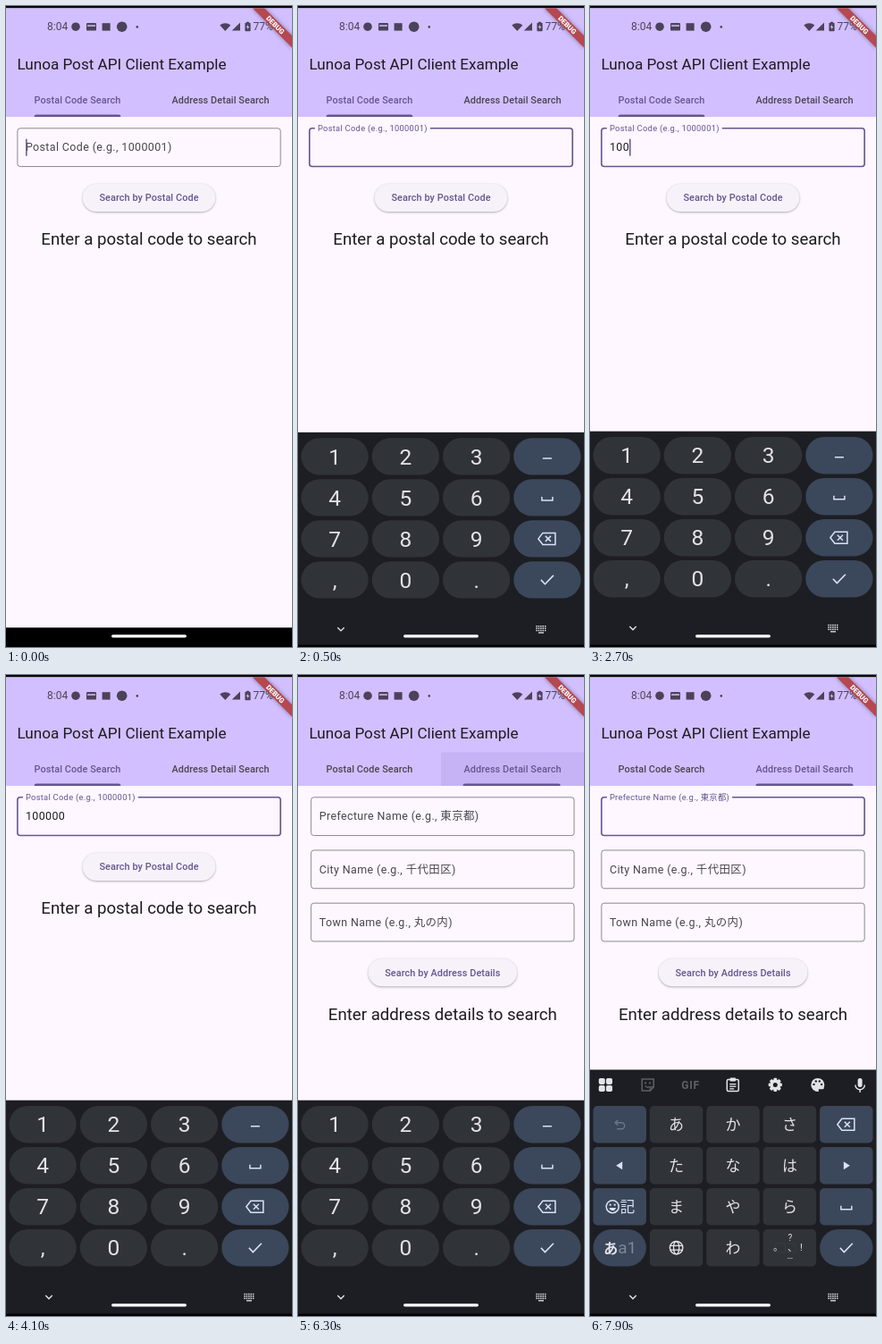
Animation of 320x717 px, one loop 8 s. Source, as an HTML page with a canvas:

```html
<!DOCTYPE html>
<html lang="en">
<head>
<meta charset="utf-8">
<title>Lunoa Post API Client Example</title>
<style>
html, body { margin: 0; width: 100%; height: 100%; overflow: hidden; background: #000; }
canvas { display: block; width: 320px; height: 717px; }
</style>
</head>
<body>
<canvas id="stage"></canvas>
<script>
const W = 320, H = 717, LOOP = 8000;
const DP = W / 411.43;
const canvas = document.getElementById('stage');
const ctx = canvas.getContext('2d');
const ratio = Math.max(1, window.devicePixelRatio || 1);
canvas.width = W * ratio;
canvas.height = H * ratio;

const BAR = '#d2bfff', PAGE = '#fef7ff', INK = '#1d1b20', SOFT = '#49454f';
const PRIMARY = '#65558f', OUTLINE = '#79747e', STATUS = '#4b4359';
const KB = '#1d1e23', KEY = '#303338', KEY_BLUE = '#3b475a';
const GLYPH = '#e3e3e8', GLYPH_BLUE = '#d8e3f8', DIM = '#5d6067';
const FONTS = 'Roboto, "Noto Sans CJK JP", sans-serif';

const FOCUS_1 = 40, KB_UP = 170, SEARCH = 4150, RESULTS = 4650;
const SWIPE = 6031, FOCUS_2 = 7200, KB_SWAP = 7400;
const TYPED = [[1150, '1'], [1450, '0'], [1700, '0'], [2950, '0'], [3200, '0'], [3500, '0']];
const TOWNS = ['', '大手町', '皇居外苑', '千代田', '一ツ橋', '丸の内', '有楽町'];

const clamp = v => Math.min(1, Math.max(0, v));
const span = (t, from, length) => clamp((t - from) / length);
const mix = (a, b, k) => a + (b - a) * k;
const easeOut = k => 1 - Math.pow(1 - k, 4);

// cubic-bezier(.25, .1, .25, 1)
function ease(x) {
  let lo = 0, hi = 1;
  for (let i = 0; i < 20; i++) {
    const s = (lo + hi) / 2;
    if (0.75 * s * (1 - s) + s * s * s < x) lo = s; else hi = s;
  }
  const s = lo, r = 1 - s;
  return 0.3 * s * r * r + 3 * s * s * r + s * s * s;
}

function mixColor(a, b, k) {
  const part = (c, i) => parseInt(c.slice(i, i + 2), 16);
  return 'rgb(' + [1, 3, 5].map(i => Math.round(mix(part(a, i), part(b, i), k))) + ')';
}

// y is the middle of the line box
function text(str, x, y, size, color, o = {}) {
  ctx.font = `${o.weight || 400} ${size}px ${FONTS}`;
  ctx.letterSpacing = (o.gap || 0) + 'px';
  ctx.textAlign = o.align || 'left';
  ctx.fillStyle = color;
  ctx.fillText(str, x, y + 0.342 * size);
  const width = ctx.measureText(str).width;
  ctx.letterSpacing = '0px';
  return width;
}

function rect(x, y, w, h, color) {
  ctx.fillStyle = color;
  ctx.fillRect(x, y, w, h);
}

function round(x, y, w, h, r, color) {
  ctx.beginPath();
  ctx.roundRect(x, y, w, h, r);
  ctx.fillStyle = color;
  ctx.fill();
}

function disc(x, y, r, color) {
  ctx.beginPath();
  ctx.arc(x, y, r, 0, 7);
  ctx.fillStyle = color;
  ctx.fill();
}

function ring(x, y, rx, color, width, ry = rx) {
  ctx.beginPath();
  ctx.ellipse(x, y, rx, ry, 0, 0, 7);
  ctx.strokeStyle = color;
  ctx.lineWidth = width;
  ctx.stroke();
}

function trace(points, dx, dy) {
  ctx.beginPath();
  for (let i = 0; i < points.length; i += 2) ctx.lineTo(dx + points[i], dy + points[i + 1]);
}

function line(points, dx, dy, color, width = 1.3, closed = false) {
  trace(points, dx, dy);
  if (closed) ctx.closePath();
  ctx.strokeStyle = color;
  ctx.lineWidth = width;
  ctx.stroke();
}

function poly(points, dx, dy, color) {
  trace(points, dx, dy);
  ctx.fillStyle = color;
  ctx.fill();
}

function box(x, y, w, h, r, color, width) {
  ctx.beginPath();
  ctx.roundRect(x, y, w, h, r);
  ctx.strokeStyle = color;
  ctx.lineWidth = width;
  ctx.stroke();
}

function statusBar() {
  text('8:04', 46, 23, 12, STATUS);
  disc(78, 23.2, 4.8, STATUS);
  round(90, 19, 11, 8.6, 1.2, STATUS);
  rect(91, 21.3, 9, 1.5, BAR);
  rect(107.6, 19.2, 9, 8.4, STATUS);
  disc(129.7, 23.2, 5.8, STATUS);
  disc(146.8, 23.4, 1.3, STATUS);
  ctx.beginPath();
  ctx.moveTo(245.3, 28);
  ctx.arc(245.3, 28, 8.8, -Math.PI * 0.74, -Math.PI * 0.26);
  ctx.fillStyle = STATUS;
  ctx.fill();
  poly([252.8, 27.6, 262, 27.6, 262, 18.4], 0, 0, STATUS);
  round(269, 17.8, 3, 2, 0.5, STATUS);
  round(267.4, 18.8, 6.2, 9.4, 1, STATUS);
  poly([0.5, -3, -1.8, 0.6, -0.2, 0.6, -0.5, 3, 1.8, -0.6, 0.2, -0.6], 270.5, 23.5, BAR);
  text('77%', 276.5, 23, 12, STATUS);
}

function ribbon() {
  ctx.save();
  ctx.beginPath();
  ctx.rect(0, 2.5, W, 80);
  ctx.clip();
  ctx.translate(W, 2.5);
  ctx.rotate(Math.PI / 4);
  ctx.shadowColor = 'rgba(0,0,0,.4)';
  ctx.shadowBlur = 5 * ratio;
  rect(-40 * DP, 28 * DP, 80 * DP, 12 * DP, '#b54850');
  ctx.shadowColor = 'transparent';
  text('DEBUG', 0, 34 * DP, 10.2 * DP, '#fff', { weight: 900, align: 'center' });
  ctx.restore();
}

function header(t, k) {
  rect(0, 2.5, W, 121.5, BAR);
  statusBar();
  text('Lunoa Post API Client Example', 12.4, 64.8, 22 * DP, INK);

  const glow = span(t, 5950, 60) * (1 - span(t, 6350, 300));
  if (glow > 0) {
    ctx.save();
    ctx.beginPath();
    ctx.rect(160, 86.6, 160, 37.4);
    ctx.clip();
    ctx.globalAlpha = glow * 0.09;
    disc(240, 105, mix(20, 110, span(t, 5950, 240)), '#4f378b');
    ctx.restore();
  }
  const label = { weight: 500, align: 'center', gap: 0.08 };
  const w1 = text('Postal Code Search', 80, 105.2, 14 * DP, mixColor(PRIMARY, SOFT, k), label);
  const w2 = text('Address Detail Search', 240, 105.2, 14 * DP, mixColor(SOFT, PRIMARY, k), label);
  const w = mix(w1, w2, k);
  round(mix(80, 240, k) - w / 2, 121.6, w, 2.4, [2.3, 2.3, 0, 0], PRIMARY);
}

function caret(x, y) {
  rect(x, y - 9.5, 1.5, 19, PRIMARY);
}

function field(y, label, focus, value, caretOn) {
  const x = 16 * DP, w = W - 2 * x, h = 56 * DP, size = 16 * DP;
  const k = ease(focus), mid = y + h / 2;
  box(x + 0.4, y + 0.4, w - 0.8, h - 0.8, 3, mixColor(OUTLINE, PRIMARY, k), mix(0.85, 1.6, k));
  const scale = mix(1, 0.75, k);
  ctx.font = `400 ${size * scale}px ${FONTS}`;
  ctx.letterSpacing = 0.39 * scale + 'px';
  const labelW = ctx.measureText(label).width;
  if (k > 0.02) rect(mix(21.9 + labelW / 2, 18.9, k), y - 1.5, (labelW + 6) * k, 4, PAGE);
  text(label, 21.9, mix(mid, y + 0.6, k), size * scale, mixColor(SOFT, PRIMARY, k), { gap: 0.39 * scale });
  const valueW = value ? text(value, 21.9, mid, size, INK, { gap: 0.39 }) : 0;
  if (caretOn) caret(value ? 21.9 + valueW : 22.1, mid);
}

function button(label, y, glow) {
  const size = 14 * DP;
  ctx.font = `500 ${size}px ${FONTS}`;
  const w = ctx.measureText(label).width + label.length * 0.08 + 48 * DP;
  ctx.save();
  ctx.shadowColor = 'rgba(0,0,0,.32)';
  ctx.shadowBlur = 2.4 * ratio;
  ctx.shadowOffsetY = 0.9 * ratio;
  round(160 - w / 2, y, w, 31.1, 15.55, '#f7f2fa');
  ctx.restore();
  if (glow > 0) round(160 - w / 2, y, w, 31.1, 15.55, `rgba(101,85,143,${0.14 * glow})`);
  text(label, 160, y + 15.7, size, PRIMARY, { weight: 500, align: 'center', gap: 0.08 });
}

function blink(t) {
  const resets = [0, ...TYPED.map(p => p[0])].filter(r => r <= t);
  let from = resets[resets.length - 1];
  if (from === 3500) from = 3550;
  return t < from || Math.floor((t - from) / 500) % 2 === 0;
}

function postalPage(t) {
  const value = TYPED.filter(p => p[0] <= t).map(p => p[1]).join('');
  field(136.4, 'Postal Code (e.g., 1000001)', span(t, FOCUS_1, 167), value, blink(t));
  button('Search by Postal Code', 198.9, span(t, SEARCH, 80) * (1 - span(t, SEARCH + 200, 250)));
  if (t < RESULTS) {
    text('Enter a postal code to search', 160, 260.8, 24 * DP, INK, { align: 'center' });
  } else {
    TOWNS.forEach((town, i) =>
      text('東京都 千代田区 ' + town, 52.8, 262.5 + i * 26.5, 24 * DP, INK));
  }
}

function addressPage(t) {
  const caretOn = t >= FOCUS_2 && t < FOCUS_2 + 500;
  field(136.4, 'Prefecture Name (e.g., 東京都)', span(t, FOCUS_2, 167), '', caretOn);
  field(195.6, 'City Name (e.g., 千代田区)', 0);
  field(254.8, 'Town Name (e.g., 丸の内)', 0);
  button('Search by Address Details', 317.2, 0);
  text('Enter address details to search', 160, 379.2, 24 * DP, INK, { align: 'center' });
}

const icons = {
  minus: (x, y) => line([-5, 2, 5, 2], x, y, GLYPH_BLUE, 1.5),
  space: (x, y) => line([-6, -1, -6, 3, 6, 3, 6, -1], x, y, GLYPH_BLUE, 1.5),
  back(x, y) {
    line([-10, 0, -5, -6.5, 9, -6.5, 9, 6.5, -5, 6.5], x, y, GLYPH_BLUE, 1.5, true);
    line([-2, -3, 4, 3], x, y, GLYPH_BLUE, 1.5);
    line([4, -3, -2, 3], x, y, GLYPH_BLUE, 1.5);
  },
  check: (x, y) => line([-7, 0, -2.5, 4.8, 7, -5], x, y, GLYPH_BLUE, 1.6),
  undo(x, y) {
    const c = '#69768a';
    line([-2, -5, -5, -2, -2, 1], x, y, c, 1.4);
    ctx.beginPath();
    ctx.moveTo(x - 5, y - 2);
    ctx.lineTo(x + 2, y - 2);
    ctx.arc(x + 2, y + 1.5, 3.5, -Math.PI / 2, Math.PI / 2);
    ctx.lineTo(x - 3, y + 5);
    ctx.stroke();
  },
  left: (x, y) => poly([-4, 0, 3, -4.5, 3, 4.5], x, y, GLYPH_BLUE),
  right: (x, y) => poly([4, 0, -3, -4.5, -3, 4.5], x, y, GLYPH_BLUE),
  emoji(x, y) {
    ring(x - 8, y, 7, GLYPH_BLUE, 1.5);
    disc(x - 10.5, y - 2, 1.1, GLYPH_BLUE);
    disc(x - 5.5, y - 2, 1.1, GLYPH_BLUE);
    ctx.beginPath();
    ctx.arc(x - 8, y + 0.5, 3.8, 0.2, Math.PI - 0.2);
    ctx.fill();
    text('記', x + 0.5, y + 0.4, 16.5, GLYPH_BLUE);
  },
  mode(x, y) {
    text('あ', x - 18, y + 0.5, 16, GLYPH, { weight: 700 });
    text('a1', x - 2, y - 0.5, 19, '#7c8798');
  },
  globe(x, y) {
    ring(x, y, 7.2, GLYPH, 1.4);
    ring(x, y, 3.1, GLYPH, 1.3, 7.2);
    line([-6.6, -2.4, 6.6, -2.4], x, y, GLYPH, 1.2);
    line([-6.6, 2.4, 6.6, 2.4], x, y, GLYPH, 1.2);
  },
  marks(x, y) {
    box(x - 16, y - 5, 11, 10, 1, '#3c3f45', 0.8);
    box(x - 5, y - 5, 11, 10, 1, '#3c3f45', 0.8);
    const o = { align: 'center' };
    text('。', x - 13, y, 11, GLYPH, o);
    text('、', x + 3, y, 11, GLYPH, o);
    text('?', x + 0.5, y - 11, 10, GLYPH, o);
    text('!', x + 13, y, 11, GLYPH, o);
    text('…', x + 0.5, y + 9, 10, GLYPH, o);
  }
};

const PAD = [['1', '2', '3', 'minus'], ['4', '5', '6', 'space'], ['7', '8', '9', 'back'], [',', '0', '.', 'check']];
const KANA = [['undo', 'あ', 'か', 'さ', 'back'], ['left', 'た', 'な', 'は', 'right'],
  ['emoji', 'ま', 'や', 'ら', 'space'], ['mode', 'globe', 'わ', 'marks', 'check']];

function keys(rows, size, pills, pressed) {
  const cols = rows[0].length, step = 317 / cols, w = step - 4;
  rows.forEach((row, j) => row.forEach((name, i) => {
    const x = 3.5 + i * step, y = 482 + j * 46, edge = i === cols - 1 || (!pills && i === 0);
    const r = pills || (j === 3 && edge) ? 20.7 : 5;
    const hot = name === pressed;
    round(x, y, w, 41.4, r, hot ? '#50545b' : edge ? KEY_BLUE : KEY);
    const cx = x + w / 2, cy = y + 20.7;
    if (icons[name]) icons[name](cx, cy);
    else text(name, cx, cy + 0.3, size, GLYPH, { align: 'center' });
  }));
}

function toolbar(y) {
  for (const dx of [9.8, 18]) for (const dy of [-7.5, 0.7]) round(dx, y + dy, 7, 7, 1.8, GLYPH);
  line([-6.5, -6.5, 6.5, -6.5, 6.5, 2.5, 2.5, 6.5, -6.5, 6.5], 64.7, y, DIM, 1.5, true);
  line([6.5, 2.5, 2.5, 2.5, 2.5, 6.5], 64.7, y, DIM, 1.2);
  disc(62, y - 2, 1.1, DIM);
  disc(67, y - 2, 1.1, DIM);
  line([-3, 1.5, 0, 3, 2, 2], 64.7, y, DIM, 1.2);
  text('GIF', 112.5, y, 12, DIM, { weight: 700, align: 'center', gap: 0.8 });
  box(153.3, y - 6, 13, 13, 1.5, GLYPH, 1.5);
  round(156.6, y - 8, 6.4, 4.2, 1, GLYPH);
  for (const dy of [-1.4, 1.2, 3.8]) rect(156.2, y + dy, dy > 3 ? 5 : 7.2, 1.3, GLYPH);
  for (let i = 0; i < 4; i++) {
    ctx.save();
    ctx.translate(207.3, y);
    ctx.rotate(i * Math.PI / 4);
    round(-1.9, -7.6, 3.8, 15.2, 1, GLYPH);
    ctx.restore();
  }
  disc(207.3, y, 5.8, GLYPH);
  disc(207.3, y, 2.5, KB);
  disc(254.8, y, 7.5, GLYPH);
  disc(259, y + 5.5, 3.3, KB);
  round(254.5, y + 1.8, 7.3, 3, 1.5, GLYPH);
  for (const [dx, dy] of [[-4.3, -0.5], [-2, -4], [2, -4], [4.3, -0.5]]) disc(254.8 + dx, y + dy, 1.2, KB);
  round(299.6, y - 7.5, 5, 10, 2.5, GLYPH);
  ctx.beginPath();
  ctx.arc(302.1, y, 5.3, 0, Math.PI);
  ctx.strokeStyle = GLYPH;
  ctx.lineWidth = 1.4;
  ctx.stroke();
  line([0, 5, 0, 8.5], 302.1, y, GLYPH, 1.4);
}

function keyboard(t) {
  const rise = easeOut(span(t, KB_UP, 450));
  if (rise <= 0) return;
  const kana = t >= KB_SWAP;
  ctx.save();
  ctx.beginPath();
  ctx.rect(0, 0, W, 714.4);
  ctx.clip();
  ctx.translate(0, 242 * (1 - rise));
  rect(0, kana ? 441.5 : 475.7, W, 300, KB);
  if (kana) {
    toolbar(458.4);
    keys(KANA, 17, false);
  } else {
    const press = TYPED.find(p => t >= p[0] - 120 && t < p[0] + 20);
    keys(PAD, 24.5, true, press && press[1]);
  }
  line([-3.7, -1.8, 0, 1.9, 3.7, -1.8], 48, 695.8, GLYPH, 1.4);
  for (let j = 0; j < 3; j++) {
    for (let i = 0; i < 5; i++) rect(266.3 + i * 2.4, 691.8 + j * 2.4, 1.5, 1.5, GLYPH);
  }
  rect(269, 699.2, 6, 1.3, GLYPH);
  ctx.restore();
}

function draw(t) {
  ctx.setTransform(ratio, 0, 0, ratio, 0, 0);
  rect(0, 0, W, H, '#000');
  rect(0, 2.5, W, 692.8, PAGE);
  const k = ease(span(t, SWIPE, 300));
  const pages = [[postalPage, -W * k], [addressPage, W * (1 - k)]];
  for (const [page, x] of pages) {
    if (Math.abs(x) >= W) continue;
    ctx.save();
    ctx.translate(x, 0);
    page(t);
    ctx.restore();
  }
  header(t, k);
  ribbon();
  keyboard(t);
  round(118, 703.2, 84, 3.2, 1.6, '#fff');
}

const start = performance.now();
function tick() {
  draw((performance.now() - start) % LOOP);
  requestAnimationFrame(tick);
}
tick();
</script>
</body>
</html>
```
